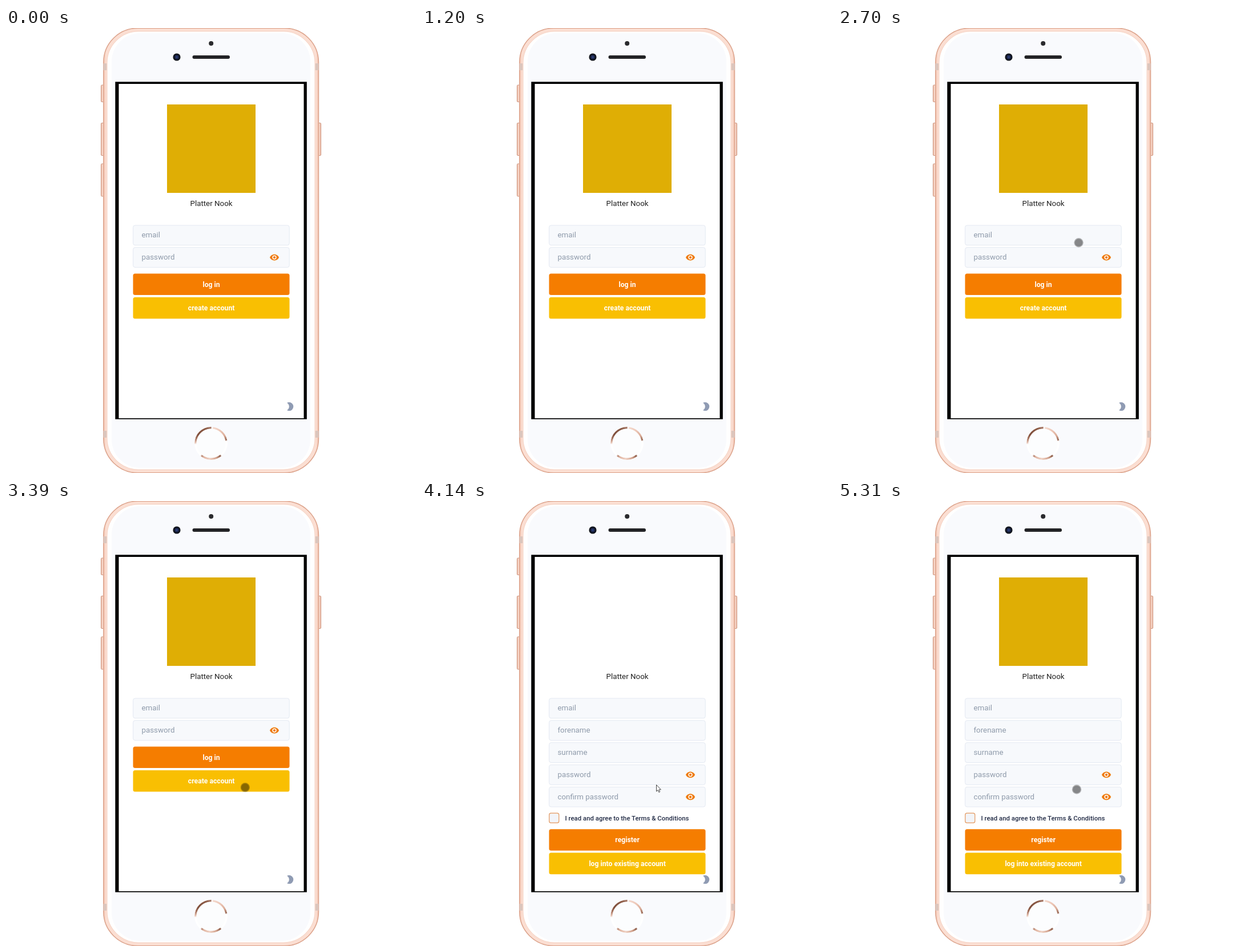
These frames come from a looping animation (718 by 780 pixels, 5340 ms). An HTML page:

```html
<!DOCTYPE html>
<html lang="en">
<head>
<meta charset="utf-8">
<title>Login demo</title>
<style>
  html, body { margin: 0; width: 100%; height: 100%; overflow: hidden; background: #fff; }
  svg { display: block; position: absolute; left: 0; top: 0; }
  text { font-family: Roboto, Arial, sans-serif; }
  .title { font-size: 13.35px; fill: #222; text-anchor: middle; }
  .hint { font-size: 13.3px; fill: #8f9bab; }
  .label { font-size: 12.2px; font-weight: 700; fill: #fff; text-anchor: middle; }
  .terms { font-size: 11.4px; font-weight: 500; fill: #222b45; }
  .home {
    position: absolute; left: 330px; top: 698.5px; width: 58px; height: 58px; border-radius: 50%;
    background: conic-gradient(#a87967 0deg, #fff 3deg, #f4d9cd 9deg, #edc8b8 35deg, #dcae9a 60deg,
      #9a6a56 77deg, #fff 82deg, #fff 139deg, #8d5d49 143deg, #d3a48f 160deg, #efd0c2 185deg,
      #e0b5a2 208deg, #b98a76 216deg, #fff 221deg, #fff 266deg, #e0b8a6 274deg, #a87662 288deg,
      #7f4f3c 305deg, #8d5d49 340deg, #a87967 360deg);
    -webkit-mask: radial-gradient(circle, transparent 25.2px, #000 26px);
    mask: radial-gradient(circle, transparent 25.2px, #000 26px);
  }
</style>
</head>
<body>
<svg width="718" height="780" viewBox="0 0 718 780">
  <defs>
    <clipPath id="screen"><rect x="197.5" y="98" width="324" height="586"/></clipPath>
    <linearGradient id="rim">
      <stop offset="0" stop-color="#f3c5b2"/>
      <stop offset=".012" stop-color="#fbded2"/>
      <stop offset=".988" stop-color="#fbded2"/>
      <stop offset="1" stop-color="#f3c5b2"/>
    </linearGradient>
    <linearGradient id="key">
      <stop offset="0" stop-color="#eab7a2"/>
      <stop offset=".5" stop-color="#fbdccf"/>
      <stop offset="1" stop-color="#e9b8a4"/>
    </linearGradient>
    <radialGradient id="lens">
      <stop offset="0" stop-color="#33478a"/>
      <stop offset=".5" stop-color="#17203f"/>
      <stop offset=".8" stop-color="#0c0f16"/>
      <stop offset="1" stop-color="#24262b"/>
    </radialGradient>
    <g id="eye" transform="scale(.73)">
      <path d="M0-7.5C-5-7.5-9.27-4.39-11 0C-9.27 4.39-5 7.5 0 7.5S9.27 4.39 11 0C9.27-4.39 5-7.5 0-7.5Z" fill="#ef7b0c"/>
      <circle r="5" fill="#fff"/>
      <circle r="3" fill="#ef7b0c"/>
    </g>
  </defs>

  <g fill="url(#key)" stroke="#cf9781">
    <rect x="166.5" y="100" width="6" height="29.5" rx="1.5"/>
    <rect x="166.5" y="166.5" width="6" height="57" rx="1.5"/>
    <rect x="166.5" y="238" width="6" height="57" rx="1.5"/>
    <rect x="545.5" y="166.5" width="6" height="57" rx="1.5"/>
  </g>
  <rect x="170.8" y=".2" width="376.6" height="779.6" rx="60" fill="url(#rim)" stroke="#dda58e" stroke-width="1.6"/>
  <g fill="#dcc6bd">
    <rect x="170.5" y="62" width="6" height="12"/>
    <rect x="541.5" y="62" width="6" height="12"/>
    <rect x="170.5" y="706" width="6" height="12"/>
    <rect x="541.5" y="706" width="6" height="12"/>
  </g>
  <rect x="177" y="6" width="364" height="768" rx="55" fill="#fff" stroke="#f6d6c8" stroke-width="1.2"/>
  <rect x="185" y="9" width="348" height="762" rx="50" fill="#f9fafd"/>

  <circle cx="359.2" cy="27" r="4" fill="#2a2a2d"/>
  <circle cx="299" cy="51" r="6.6" fill="url(#lens)"/>
  <rect x="326.5" y="48" width="65.5" height="6" rx="3" fill="#222225"/>
  <circle cx="359" cy="727.5" r="27" fill="#fcfdfe"/>

  <rect x="191.3" y="94.3" width="335.5" height="591.4" fill="#000"/>
  <rect x="197.5" y="98" width="324" height="586" fill="#fff"/>

  <rect id="logo" x="282" y="134" width="155" height="155" fill="#dfae05"/>
  <text class="title" x="359.5" y="312.3">Platter Nook</text>
  <g id="login"></g>
  <g id="register"></g>
  <path transform="translate(488.3 654.6) scale(.75)" fill="#8f9bb3"
    d="M10 2C8.2 2 6.5 2.5 5 3.35C8 5.1 10 8.3 10 12S8 18.9 5 20.65C6.5 21.5 8.2 22 10 22A10 10 0 0 0 10 2Z"/>

  <g clip-path="url(#screen)">
    <g id="dot">
      <circle r="8.2" fill-opacity=".28"/>
      <circle r="6.8" fill-opacity=".25"/>
    </g>
    <path id="arrow" d="M410.5 497.5V509L413.1 506.6L414.9 510.6L416.7 509.8L415 505.9H418.4Z"
      fill="#fff" stroke="#333" stroke-width=".9"/>
  </g>
</svg>
<div class="home"></div>

<script>
const LOOP = 5340;
const REGISTER_AT = 4050, LOGO_BACK_AT = 4230, DOT_BACK_AT = 4290;
// time, x, y of the touch point
const PATH = [
  [1710, 531, 384], [2010, 469.5, 375.5], [2340, 432, 374], [2700, 421.5, 376.3],
  [2850, 421, 380], [3300, 418.8, 502], [3600, 418.8, 502], [3900, 418, 505.5]
];
const ORANGE = '#f57d00', YELLOW = '#f9bf02';
const get = id => document.getElementById(id);

const field = (y, hint, secret) => `
  <rect x="222.6" y="${y}" width="273.6" height="34.8" rx="3.5" fill="#f7f9fc" stroke="#e4e9f2"/>
  <text class="hint" x="237.5" y="${y + 21.4}">${hint}</text>
  ${secret ? `<use href="#eye" x="470" y="${y + 17.4}"/>` : ''}`;

const button = (y, label, fill) => `
  <rect x="222.5" y="${y}" width="274" height="37.6" rx="3.5" fill="${fill}"/>
  <text class="label" x="359.6" y="${y + 23.2}">${label}</text>`;

get('login').innerHTML =
  field(345.9, 'email') + field(384.7, 'password', true) +
  button(430.5, 'log in', ORANGE) + button(471.9, 'create account', YELLOW);

get('register').innerHTML =
  ['email', 'forename', 'surname', 'password', 'confirm password']
    .map((hint, i) => field(345.9 + i * 38.85, hint, i > 2)).join('') +
  `<rect x="222.8" y="547.2" width="17" height="17" rx="3" fill="#f2f4f9" stroke="#e3965c" stroke-width="1.2"/>
   <text class="terms" x="250.5" y="560">I read and agree to the Terms &amp; Conditions</text>` +
  button(575.2, 'register', ORANGE) + button(616.6, 'log into existing account', YELLOW);

function touchAt(t) {
  const i = PATH.findIndex(p => p[0] > t);
  if (i < 0) return PATH[PATH.length - 1].slice(1);
  if (i === 0) return PATH[0].slice(1);
  const [t0, x0, y0] = PATH[i - 1], [t1, x1, y1] = PATH[i];
  let k = (t - t0) / (t1 - t0);
  if (t0 >= 2850) k = k * k * (3 - 2 * k);
  return [x0 + (x1 - x0) * k, y0 + (y1 - y0) * k];
}

const show = (id, on) => { get(id).style.display = on ? '' : 'none'; };

function draw(now) {
  const t = Math.floor((now % LOOP) / 30) * 30;
  const registering = t >= REGISTER_AT;
  const loading = registering && t < DOT_BACK_AT;
  show('login', !registering);
  show('register', registering);
  show('logo', !registering || t >= LOGO_BACK_AT);
  show('arrow', loading);
  show('dot', t >= PATH[0][0] && !loading);
  get('dot').setAttribute('transform', `translate(${touchAt(t)})`);
}

const start = performance.now();
function tick() {
  draw(performance.now() - start);
  requestAnimationFrame(tick);
}
tick();
</script>
</body>
</html>
```
